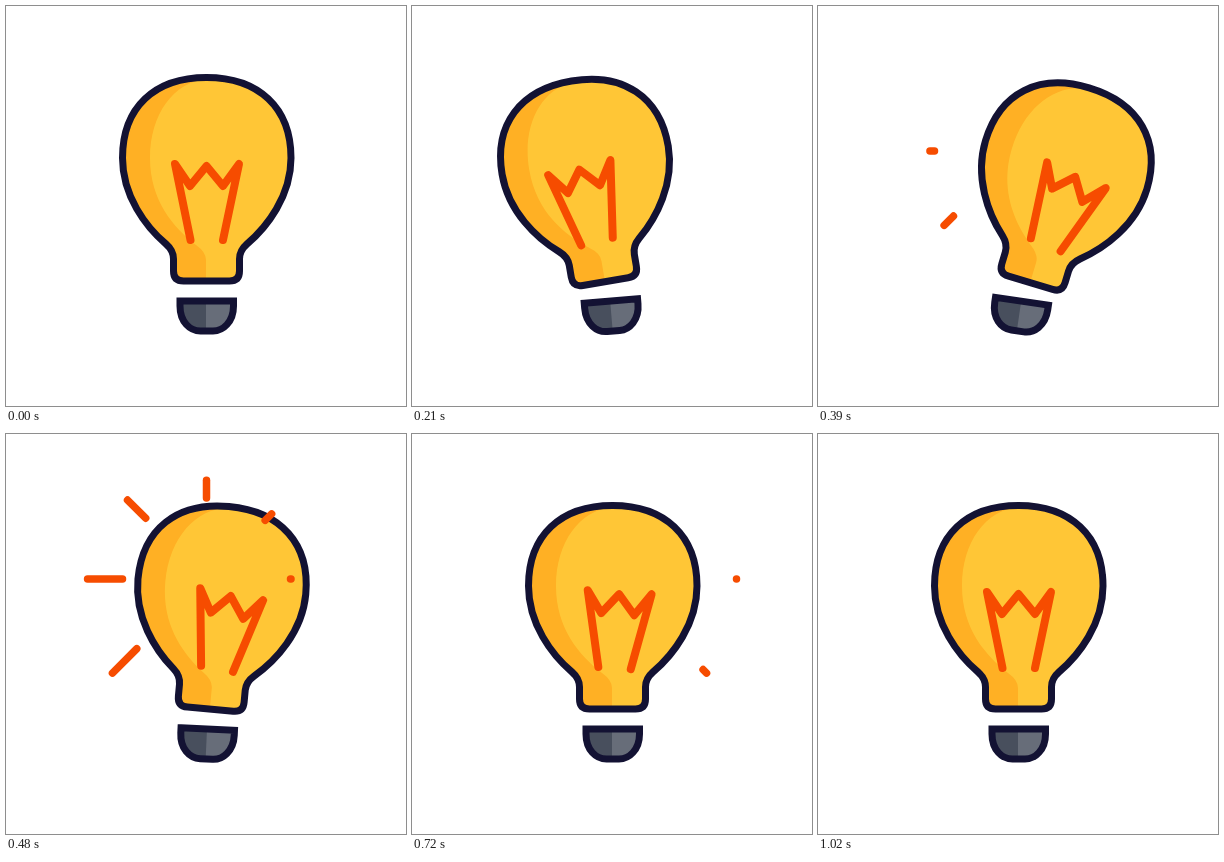
An HTML page that plays this animation: 400x400 px, repeating every 1.05 s.

```html
<!DOCTYPE html>
<html lang="en">
<head>
<meta charset="utf-8">
<title>Light bulb</title>
<style>
  html, body { margin: 0; width: 100%; height: 100%; overflow: hidden; background: #fff; }
  svg { display: block; width: 100%; height: 100%; }
  .ink { fill: none; stroke: #131233; stroke-width: 7; }
  .glow { fill: none; stroke: #f64c00; stroke-width: 8; stroke-linecap: round; stroke-linejoin: round; }
  #rays { stroke-width: 7.5; }
</style>
</head>
<body>
<svg viewBox="0 0 400 400">
  <defs>
    <path id="glass" d="M200.5 71.5C148.5 71.5 116.5 101.500 116.500 152C116.500 190 140 221 160 238Q167.500 244.500 167.500 253V265Q167.500 275 177.500 275H223.500Q233.500 275 233.500 265V253Q233.500 244.500 241 238C261 221 285 190 285 152C285 101.500 252.500 71.500 200.500 71.500Z"/>
    <path id="base" d="M174 295H227.500V300C227.500 316 217 325 207 325H194.500C184 325 174 316 174 300Z"/>
    <clipPath id="inGlass"><use href="#glass"/></clipPath>
    <clipPath id="inBase"><use href="#base"/></clipPath>
  </defs>
  <g id="bulb">
    <use href="#glass" fill="#ffc636"/>
    <path clip-path="url(#inGlass)" fill="#ffb024" d="M200 73C168 76 144 108 144 152C144 195 168 222 190 239Q200 246 200 254V280H100V65H200Z"/>
    <use href="#glass" class="ink"/>
    <path id="filament" class="glow" d="M184.500 234L169 158L184 180L200.500 160L217 180L233 158L217 234"/>
  </g>
  <g id="cap">
    <use href="#base" fill="#676d79"/>
    <path clip-path="url(#inBase)" fill="#484f5d" d="M165 290H200V330H165Z"/>
    <use href="#base" class="ink"/>
  </g>
  <g id="rays" class="glow"></g>
</svg>
<script>
const LOOP = 1050, STEP = 30;

// [step, degrees]; each pair of keys is joined by a sine ease
const swing = [[0, 0], [8, -10], [13.8, 18], [18.2, -7.5], [23.5, 0], [35, 0]];
const wobble = [[0, 0], [7, -4], [14, 7.5], [20.2, -0.4], [24.8, 4], [33.5, 0], [35, 0]];

// [direction in degrees, inner radius, outer radius], in order of appearance
const rayShapes = [
  [135, 92, 133], [180, 84, 125], [225, 86, 126], [270, 81, 122],
  [315, 83, 124], [0, 84, 124], [45, 93, 133]
];
const RAY_START = 11.7, RAY_DELAY = 0.85, RAY_TIME = 4.05, FADE_LEAD = 0.1;

const bulb = document.getElementById('bulb');
const cap = document.getElementById('cap');
const filament = document.getElementById('filament');
const rayGroup = document.getElementById('rays');
const rays = rayShapes.map(([angle, inner, outer]) => {
  const line = document.createElementNS('http://www.w3.org/2000/svg', 'line');
  rayGroup.append(line);
  return { line, inner, outer, angle: angle * Math.PI / 180 };
});

const clamp = v => Math.min(1, Math.max(0, v));

function valueAt(keys, t) {
  const i = Math.max(1, keys.findIndex(key => key[0] >= t));
  const [t0, a] = keys[i - 1], [t1, b] = keys[i];
  return a + (b - a) * (1 - Math.cos(Math.PI * clamp((t - t0) / (t1 - t0)))) / 2;
}

function turn(part, angle, pivotY) {
  part.setAttribute('transform', `rotate(${angle} 200.5 ${pivotY})`);
}

function drawRay({ line, inner, outer, angle }, t) {
  const grow = t / RAY_TIME, fade = grow - 1 + FADE_LEAD;
  const visible = grow > 0 && fade < 1.1;
  line.style.display = visible ? '' : 'none';
  if (!visible) return;
  [fade, grow].forEach((p, i) => {
    const r = inner + (outer - inner) * clamp(p);
    line.setAttribute('x' + (i + 1), 200.5 + r * Math.cos(angle));
    line.setAttribute('y' + (i + 1), 145 + r * Math.sin(angle));
  });
}

function render(ms) {
  const t = Math.floor((ms % LOOP) / STEP);
  const tilt = valueAt(swing, t);
  turn(bulb, tilt, 317);
  turn(cap, tilt / 2, 317);
  turn(filament, valueAt(wobble, t), 262);
  rays.forEach((ray, i) => drawRay(ray, t - RAY_START - i * RAY_DELAY));
}

let start;
function tick(now) {
  start ??= now;
  render(now - start);
  requestAnimationFrame(tick);
}
render(0);
requestAnimationFrame(tick);
</script>
</body>
</html>
```
